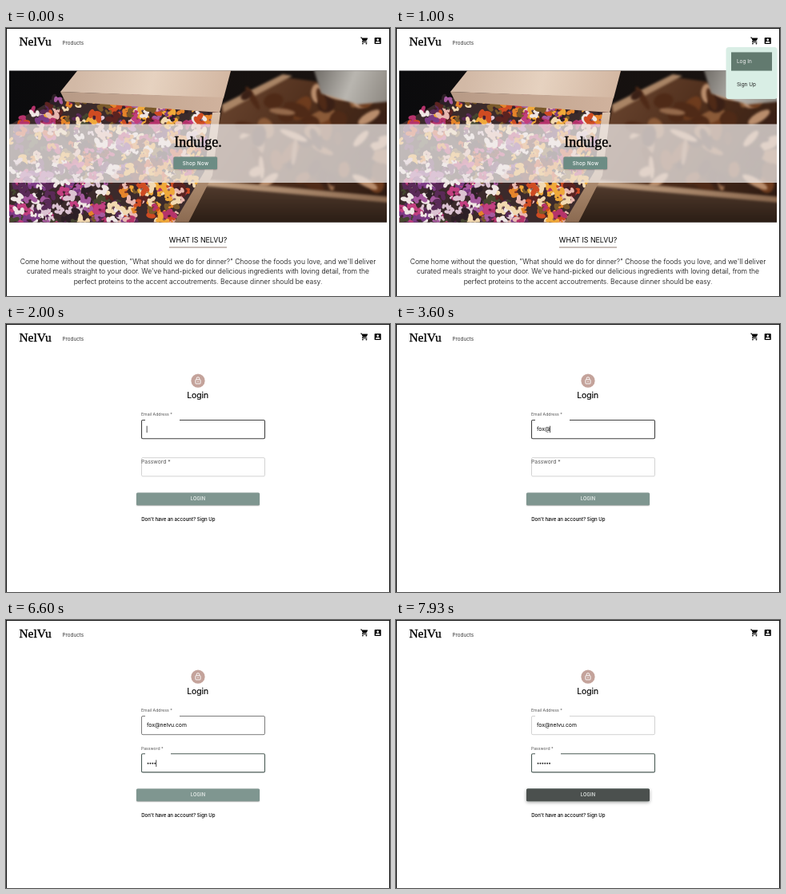
An HTML page with a canvas that plays this animation: 480x336 px, repeating every 8000 ms.

```html
<!DOCTYPE html>
<html lang="en">
<head>
<meta charset="utf-8">
<title>Meal shop login</title>
<style>
  html, body { margin: 0; width: 100%; height: 100%; overflow: hidden; background: #fff; }
  canvas { display: block; }
</style>
</head>
<body>
<canvas id="stage" width="480" height="336"></canvas>
<script>
const LOOP = 8000;
const ctx = document.getElementById('stage').getContext('2d');
const SANS = 'Inter, "Open Sans", sans-serif';
const SERIF = '"Liberation Serif", serif';
const EMAIL = 'fox@nelvu.com';
const EMAIL_KEYS = [2670, 2870, 3070, 3600, 4200, 4330, 4400, 4530, 4600, 4870, 5070, 5270, 5400];
const PASSWORD_KEYS = [5930, 6130, 6330, 6600, 6800, 7070];
const PAGE_CHANGE = 1070, FOCUS_PASSWORD = 5660;

const CART = new Path2D('M7 18c-1.1 0-1.99.9-1.99 2S5.9 22 7 22s2-.9 2-2-.9-2-2-2zM1 2v2h2l3.6 7.59-1.35 2.45c-.16.28-.25.61-.25.96 0 1.1.9 2 2 2h12v-2H7.42c-.14 0-.25-.11-.25-.25l.03-.12.9-1.63h7.45c.75 0 1.41-.41 1.75-1.03l3.58-6.49c.08-.14.12-.31.12-.48 0-.55-.45-1-1-1H5.21l-.94-2H1zm16 16c-1.1 0-1.99.9-1.99 2s.89 2 1.99 2 2-.9 2-2-.9-2-2-2z');
const ACCOUNT = new Path2D('M3 5v14c0 1.1.89 2 2 2h14c1.1 0 2-.9 2-2V5c0-1.1-.9-2-2-2H5c-1.11 0-2 .9-2 2zm12 4c0 1.66-1.34 3-3 3s-3-1.34-3-3 1.34-3 3-3 3 1.34 3 3zm-9 8c0-2 4-3.1 6-3.1s6 1.1 6 3.1v1H6v-1z');

const progress = (t, from, to) => Math.min(1, Math.max(0, (t - from) / (to - from)));
const easeOut = p => 1 - (1 - p) ** 3;
const mix = (a, b, p) => a + (b - a) * p;
const grey = v => `rgb(${v},${v},${v})`;
const typed = (keys, t) => keys.filter(k => k <= t).length;

function text(str, x, y, size, { color = '#000', weight = 400, align = 'left', family = SANS, spacing = 0, stroke = 0 } = {}) {
  ctx.font = `${weight} ${size}px ${family}`;
  ctx.letterSpacing = spacing + 'px';
  ctx.textAlign = align;
  ctx.fillStyle = ctx.strokeStyle = color;
  ctx.fillText(str, x, y);
  if (stroke) {
    ctx.lineWidth = stroke;
    ctx.strokeText(str, x, y);
  }
}

function box(x, y, w, h, r, color, c = ctx) {
  c.fillStyle = color;
  c.beginPath();
  c.roundRect(x, y, w, h, r);
  c.fill();
}

function shadowBox(x, y, w, h, color, blur, dy) {
  ctx.save();
  ctx.shadowColor = 'rgba(0,0,0,.4)';
  ctx.shadowBlur = blur;
  ctx.shadowOffsetY = dy;
  box(x, y, w, h, 1.5, color);
  ctx.restore();
}

function icon(path, x, y) {
  ctx.save();
  ctx.translate(x, y);
  ctx.scale(.45, .45);
  ctx.fillStyle = '#000';
  ctx.fill(path);
  ctx.restore();
}

// Simplified photo: two open boxes, one of flowers and one of wrapped food
function makePhoto() {
  const canvas = document.createElement('canvas');
  canvas.width = 480;
  canvas.height = 336;
  const c = canvas.getContext('2d');
  let seed = 11;
  const rand = () => (seed = seed * 16807 % 2147483647) / 2147483647;
  const pick = list => list[Math.floor(rand() * list.length)];
  const gradient = (x0, y0, x1, y1, ...colors) => {
    const g = c.createLinearGradient(x0, y0, x1, y1);
    colors.forEach((color, i) => g.addColorStop(i / (colors.length - 1), color));
    return g;
  };
  const poly = (color, ...p) => {
    c.fillStyle = color;
    c.beginPath();
    for (let i = 0; i < p.length; i += 2) c.lineTo(p[i], p[i + 1]);
    c.closePath();
    c.fill();
  };
  const blob = (x, y, rx, ry, angle, color) => {
    c.fillStyle = color;
    c.beginPath();
    c.ellipse(x, y, rx, ry, angle, 0, 7);
    c.fill();
  };

  c.beginPath();
  c.rect(4, 53.5, 472, 190);
  c.clip();
  c.fillStyle = gradient(4, 0, 476, 0, '#0b0b0d', '#14100f', '#1c1512');
  c.fillRect(4, 53, 472, 191);

  // Food box
  c.filter = 'blur(1.5px)';
  poly(gradient(270, 60, 476, 200, '#6b4630', '#4c2c1a', '#2f1c13'), 270, 98, 350, 62, 480, 80, 480, 216, 250, 194);
  poly('#a98465', 270, 96, 346, 58, 358, 60, 272, 106);
  const wraps = ['#8a5a38', '#6e3c1e', '#b98d6c', '#4f2a17', '#3a2016', '#94694b'];
  for (let i = 0; i < 60; i++) {
    blob(mix(300, 476, rand()), mix(82, 196, rand()), 5 + rand() * 14, 3 + rand() * 8, rand() * 3, pick(wraps));
  }
  poly(gradient(385, 54, 476, 90, '#6f6b66', '#b9b6b0', '#8e8982'), 384, 50, 480, 50, 480, 92, 440, 96, 394, 82);
  poly(gradient(0, 200, 0, 243, '#4f392b', '#2b1d15'), 235, 192, 480, 212, 480, 246, 210, 246);
  poly(gradient(250, 0, 476, 0, '#c3a284', '#8a684e'), 248, 190, 480, 212, 480, 219, 248, 198);

  // Flower box
  c.filter = 'blur(.6px)';
  poly('#3b2a2b', 4, 122, 50, 95, 75, 86, 266, 106, 250, 180, 212, 244, 4, 244);
  const cool = ['#7d3c86', '#a65a9f', '#dcc3d2', '#c23f80', '#5a2a58', '#efe6e4', '#45472f', '#2d2026'];
  const warm = ['#e5842a', '#f0a93a', '#cf4b22', '#b5336b', '#e9b9b0', '#f2d9b0', '#7a5a2a', '#5b2320'];
  for (let i = 0; i < 650; i++) {
    const y = mix(88, 246, rand());
    const x = mix(4, 260 - Math.max(0, y - 130) * .42, rand());
    if (y < 122 - x * .5) continue;
    const warmth = y > 170 ? progress(x, 90, 170) : .65;
    const color = pick(rand() < warmth ? warm : cool);
    const r = 2 + rand() * 4, turn = rand() * 6;
    for (let k = 0; k < 3; k++) {
      const a = turn + k * 1.3;
      blob(x + Math.cos(a) * r, y + Math.sin(a) * r * .8, r, r * .6, a + 1, color);
    }
    blob(x, y, r * .35, r * .3, 0, 'rgba(60,20,40,.5)');
  }
  poly(gradient(90, 54, 270, 100, '#d2b9a6', '#e6d2c0', '#d3b7a2'), 92, 50, 282, 50, 272, 88, 68, 80);
  poly(gradient(70, 0, 270, 0, '#b79a86', '#d0b29d'), 68, 80, 272, 87, 267, 106, 74, 92);
  poly(gradient(0, 105, 0, 243, '#dcc3ae', '#b79679', '#8b6a51'), 258, 106, 268, 106, 258, 185, 228, 244, 210, 244, 248, 180);
  c.filter = 'none';
  box(4, 120.5, 472, 73.5, 0, 'rgba(240,237,235,.74)', c);
  return canvas;
}
const photo = makePhoto();

function header() {
  text('NelVu', 16.5, 22, 15.4, { family: SERIF, stroke: .35 });
  text('Products', 70.5, 20.5, 6.3, { color: '#333' });
  icon(CART, 442.8, 10.6);
  icon(ACCOUNT, 459.3, 10.6);
}

function home() {
  ctx.drawImage(photo, 0, 0);
  const center = { align: 'center' };
  text('Indulge.', 240, 149, 18, { ...center, family: SERIF, stroke: .4 });
  shadowBox(209.5, 161.5, 54.5, 15.5, '#6c8c84', 1.5, .5);
  text('Shop Now', 237, 171.6, 6.1, { ...center, color: '#fff', weight: 500, spacing: .35 });
  text('WHAT IS NELVU?', 240, 268.6, 8.8, center);
  box(204, 274.4, 72, 1, 0, '#8f7a70');
  [
    'Come home without the question, "What should we do for dinner?" Choose the foods you love, and we\'ll deliver',
    'curated meals straight to your door. We\'ve hand-picked our delicious ingredients with loving detail, from the',
    'perfect proteins to the accent accoutrements. Because dinner should be easy.'
  ].forEach((line, i) => text(line, 240, 295.5 + i * 12.7, 8.57, { ...center, weight: 300 }));
}

function field(y, notch, color, width) {
  const l = 169.5, r = 323.5, b = y + 23.2;
  ctx.strokeStyle = color;
  ctx.lineWidth = width;
  ctx.beginPath();
  ctx.moveTo(174 + notch, y);
  ctx.arcTo(r, y, r, b, 1.5);
  ctx.arcTo(r, b, l, b, 1.5);
  ctx.arcTo(l, b, l, y, 1.5);
  ctx.arcTo(l, y, r, y, 1.5);
  ctx.lineTo(174, y);
  ctx.stroke();
}

function caretAlpha(t) {
  if (t < 2670) {
    const steps = [[2470, 0], [2400, .5], [2000, 1], [1870, .5], [1600, 0], [1470, .5], [0, 1]];
    return steps.find(s => t >= s[0])[1];
  }
  return (t >= 4130 && t < 4200) || t >= 7600 ? 0 : 1;
}

function caret(x, y, t) {
  ctx.globalAlpha = caretAlpha(t);
  box(x, y, .8, 8.5, 0, '#222');
  ctx.globalAlpha = 1;
}

function login(t) {
  const onPassword = t >= FOCUS_PASSWORD;

  ctx.fillStyle = '#c4a39b';
  ctx.beginPath();
  ctx.arc(240, 71.2, 8.6, 0, 7);
  ctx.fill();
  ctx.strokeStyle = '#fff';
  ctx.lineWidth = .9;
  ctx.beginPath();
  ctx.roundRect(236.9, 69.7, 6.2, 5.2, .6);
  ctx.moveTo(238.2, 69.7);
  ctx.lineTo(238.2, 68.4);
  ctx.arc(240, 68.4, 1.8, Math.PI, 0);
  ctx.lineTo(241.8, 69.7);
  ctx.stroke();
  box(239.3, 71.6, 1.4, 1.4, .7, '#fff');
  text('Login', 239.7, 93.2, 10.3, { align: 'center', stroke: .15 });

  const blur = progress(t, 5540, FOCUS_PASSWORD), hoverLeft = progress(t, 7300, 7400);
  const border = Math.round(mix(mix(65, 110, blur), 205, hoverLeft));
  field(120.5, 43, grey(border), mix(1.1, .9, blur));
  text('Email Address *', 169, 115.4, 5.2, { color: '#555' });
  const value = EMAIL.slice(0, typed(EMAIL_KEYS, t));
  text(value, 176, 134.4, 6.8);
  if (!onPassword) caret(175.7 + ctx.measureText(value).width, 127.8, t);

  const shrink = easeOut(progress(t, FOCUS_PASSWORD, FOCUS_PASSWORD + 200));
  field(167.7, 32 * shrink, onPassword ? '#4b5b56' : '#cfcfcf', onPassword ? 1.1 : .9);
  text('Password *', 169, mix(174.9, 162.7, shrink), mix(6.8, 5.1, shrink), { color: '#555' });
  const dots = typed(PASSWORD_KEYS, t);
  for (let i = 0; i < dots; i++) box(176.6 + i * 2.9, 178.8, 1.9, 1.9, .95, '#222');
  if (onPassword) caret(175.8 + dots * 2.9, 175.5, t);

  const hover = progress(t, 7600, 7860);
  shadowBox(163, 211.5, 154, 15.7, '#7f9690', mix(1.5, 4, hover), mix(.6, 1.4, hover));
  ctx.globalAlpha = hover;
  box(163, 211.5, 154, 15.7, 1.5, '#4b504e');
  ctx.globalAlpha = 1;
  text('LOGIN', 240, 221.4, 5.7, { align: 'center', color: '#f4f8f6', weight: 500, spacing: .2 });
  text("Don't have an account? Sign Up", 169.2, 247.4, 6.05, { weight: 500 });
}

function menu(t) {
  const open = easeOut(progress(t, 40, 360)) * (1 - progress(t, 1100, 1400));
  if (!open) return;
  ctx.save();
  ctx.globalAlpha = open;
  ctx.translate(476.5, 24);
  ctx.scale(mix(.75, 1, open), mix(.56, 1, open));
  ctx.translate(-476.5, -24);
  box(412.5, 24, 64, 65, 3.5, '#d9eee5');
  const hover = progress(t, 570, 800), press = progress(t, 930, 1090);
  ctx.globalAlpha = open * hover;
  box(419, 30.5, 51, 23, 0, '#71897f');
  ctx.globalAlpha = open * press;
  box(419, 30.5, 51, 23, 0, '#50665c');
  ctx.globalAlpha = open;
  text('Log In', 426, 44.4, 6.4, { color: grey(Math.round(mix(40, 240, hover))) });
  text('Sign Up', 426, 73.4, 6.4, { color: '#222' });
  ctx.restore();
}

function draw(now) {
  const t = now % LOOP;
  ctx.fillStyle = '#fff';
  ctx.fillRect(0, 0, 480, 336);
  header();
  if (t < PAGE_CHANGE) home();
  else login(t);
  menu(t);
  ctx.fillStyle = '#111';
  ctx.fillRect(0, 0, 480, 1);
  ctx.fillRect(0, 0, 1, 336);
  ctx.fillRect(479, 0, 1, 336);
  requestAnimationFrame(draw);
}
requestAnimationFrame(draw);
</script>
</body>
</html>
```
